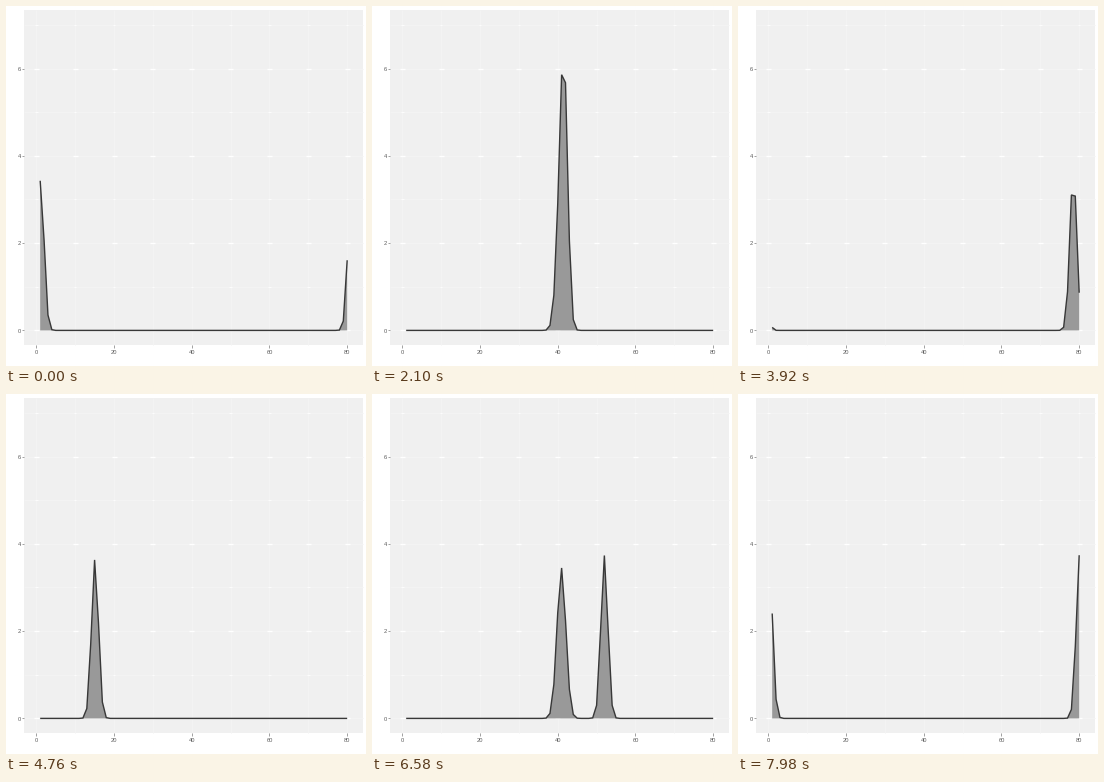
These frames come from a looping animation (360 px wide and 360 px high, 8 s). A matplotlib script:

```python
import numpy as np
import matplotlib.pyplot as plt
from matplotlib.animation import FuncAnimation
from matplotlib.patches import Polygon, Rectangle

SIZE, DPI = 360, 100
TICK_MS, STEP_MS, LOOP_MS = 20, 70, 8000
SITES = 80
PT = 72 / DPI  # points per pixel

PANEL, GRID, INK, FILL = "#f0f0f0", "#f3f3f3", "#383838", "#999999"
LABEL, TICK = "#5c5c5c", "#8c8c8c"

# The pulse runs round the ring at a nearly even pace
KEY_STEPS = (0, 11, 30, 45, 68, 94, 114)
KEY_SITES = (1.1, 15.85, 41.78, 63.27, 95.1, 132, 160.15)

# A bump lights up for a while each time the pulse covers a quarter ring
BUMP_FIRST, BUMP_PERIOD, BUMP_STEPS = 1.4, 14.28, 8

sites = np.arange(1, SITES + 1)


def px(x):
    return 30.3 + 3.886 * x


def py(y):
    return 324.4 - 43.65 * y


def bell(center, height, width):
    d = (sites - center + SITES / 2) % SITES - SITES / 2
    return height * np.exp(-0.5 * (d / width) ** 2)


def profile(step):
    total = bell(np.interp(step, KEY_STEPS, KEY_SITES), 3.45 + 0.003 * step, 0.89)
    for i in range(8):
        start = round(BUMP_FIRST + BUMP_PERIOD * i)
        if start <= step < start + BUMP_STEPS:
            total = total + bell(0.95 + SITES / 4 * i, 3.45, 1.13)
    return total


fig = plt.figure(figsize=(SIZE / DPI, SIZE / DPI), dpi=DPI, facecolor="white")
ax = fig.add_axes([0, 0, 1, 1])
ax.set_xlim(0, SIZE)
ax.set_ylim(SIZE, 0)
ax.axis("off")


def rule(x0, y0, x1, y1, color, width=1.0):
    ax.plot([x0, x1], [y0, y1], color=color, lw=width * PT,
            solid_capstyle="butt", zorder=2)


left, top, right, bottom = 18, 4, 357, 339
ax.add_patch(Rectangle((left, top), right - left, bottom - top, fc=PANEL, lw=0))

cols, rows = range(0, 81, 10), range(8)
for x in cols:
    rule(px(x), top, px(x), bottom, GRID)
for y in rows:
    rule(left, py(y), right, py(y), GRID)
for x in cols:
    for y in rows:
        half, width = (1.2, 0.8) if y % 2 else (2.5, 1.3)
        rule(px(x) - half, py(y), px(x) + half, py(y), "white", width)

text = dict(color=LABEL, fontsize=5.8 * PT, family="Liberation Sans",
            va="center_baseline")
for x in range(0, 81, 20):
    rule(px(x), bottom, px(x), bottom + 2.5, TICK, 0.8)
    ax.text(px(x), 345.6, str(x), ha="center", **text)
for y in range(0, 7, 2):
    rule(left - 2.5, py(y), left, py(y), TICK, 0.8)
    ax.text(15.2, py(y) + 0.2, str(y), ha="right", **text)

area = Polygon([(0, 0)] * 3, closed=True, fc=FILL, lw=0, zorder=3)
ax.add_patch(area)
line, = ax.plot([], [], color=INK, lw=1.4 * PT, solid_joinstyle="miter",
                solid_capstyle="butt", zorder=4)


def update(tick):
    # Half a tick ahead, so that no step comes late
    step = (tick * TICK_MS + TICK_MS // 2) // STEP_MS
    xs, ys = px(sites), py(profile(step))
    line.set_data(xs, ys)
    base = [(xs[-1], py(0)), (xs[0], py(0))]
    area.set_xy(np.vstack([np.column_stack([xs, ys]), base]))
    return area, line


anim = FuncAnimation(fig, update, frames=LOOP_MS // TICK_MS, interval=TICK_MS,
                     init_func=lambda: update(0), repeat=True, repeat_delay=0)
plt.show()
```
